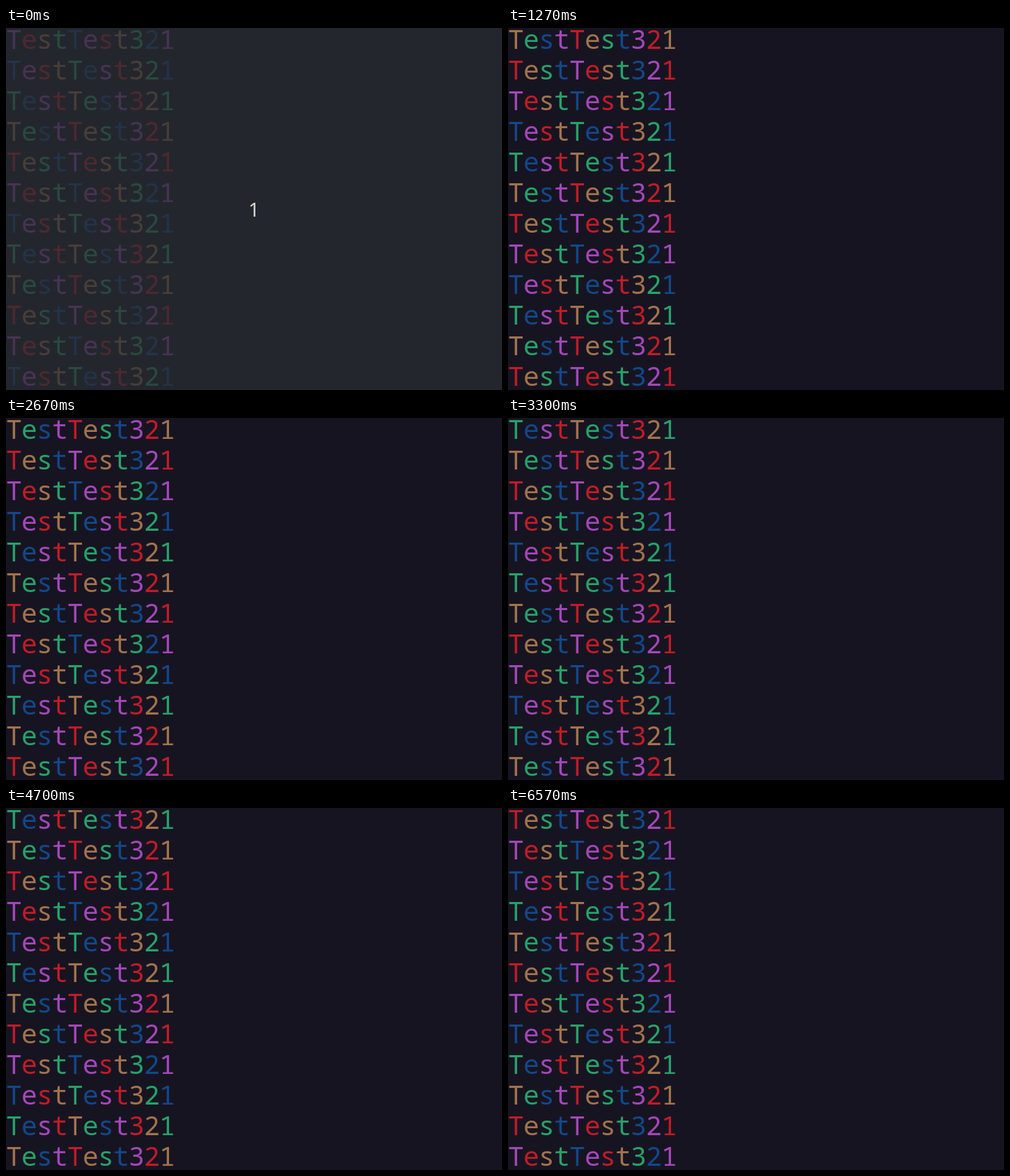
Animation of 712 by 520 pixels, one loop 6.66 s. Source, as an HTML page:

```html
<!DOCTYPE html>
<html lang="en">
<head>
<meta charset="utf-8">
<title>Rainbow terminal</title>
<style>
  html, body { margin: 0; width: 100%; height: 100%; overflow: hidden; background: #171421; }
  svg { display: block; width: 712px; height: 520px; }
  #grid { font: 38px "Noto Sans Mono", "DejaVu Sans Mono", monospace; text-anchor: middle; }
  #count { font: 500 28px "Noto Sans", "Open Sans", sans-serif; text-anchor: middle; }
</style>
</head>
<body>
<svg viewBox="0 0 712 520">
  <rect width="712" height="520" fill="#171421"/>
  <g id="grid"></g>
  <g id="overlay">
    <rect width="712" height="520" fill="rgb(40,44,50)" fill-opacity="0.75"/>
    <text id="count" x="356" y="271" fill="#d8d6d0">1</text>
  </g>
</svg>
<script>
const LOOP = 6660, DIM_END = 30, STEP = 70, TICK = 100 / 3;
const ROWS = 12, CELL_W = 22, CELL_H = 44;
const LINE = "TestTest321";
const COLORS = ["#a347ba", "#c01c28", "#a2734c", "#26a269", "#12488b"];

const grid = document.getElementById("grid");
const overlay = document.getElementById("overlay");
const cells = [];

for (let row = 0; row < ROWS; row++) {
  [...LINE].forEach((char, col) => {
    const node = document.createElementNS("http://www.w3.org/2000/svg", "text");
    node.setAttribute("x", 11.5 + col * CELL_W);
    node.setAttribute("y", 30 + row * CELL_H);
    node.textContent = char;
    grid.append(node);
    cells.push({ node, offset: col - row });
  });
}

// Each step becomes visible on the nearest 30 Hz tick, rounded to 10 ms.
const stepTime = n => Math.round(Math.round(n * STEP / TICK) * TICK / 10) * 10;

function stepAt(time) {
  let step = Math.floor(time / STEP) + 1;
  while (stepTime(step) > time) step--;
  return Math.min(step, 94);
}

function render(time) {
  const step = stepAt(time);
  overlay.setAttribute("visibility", time < DIM_END ? "visible" : "hidden");
  for (const { node, offset } of cells) {
    const index = (((offset - step) % 5) + 5) % 5;
    node.setAttribute("fill", COLORS[index]);
  }
}

const start = performance.now();
function frame() {
  render((performance.now() - start) % LOOP);
  requestAnimationFrame(frame);
}
render(0);
requestAnimationFrame(frame);
</script>
</body>
</html>
```
